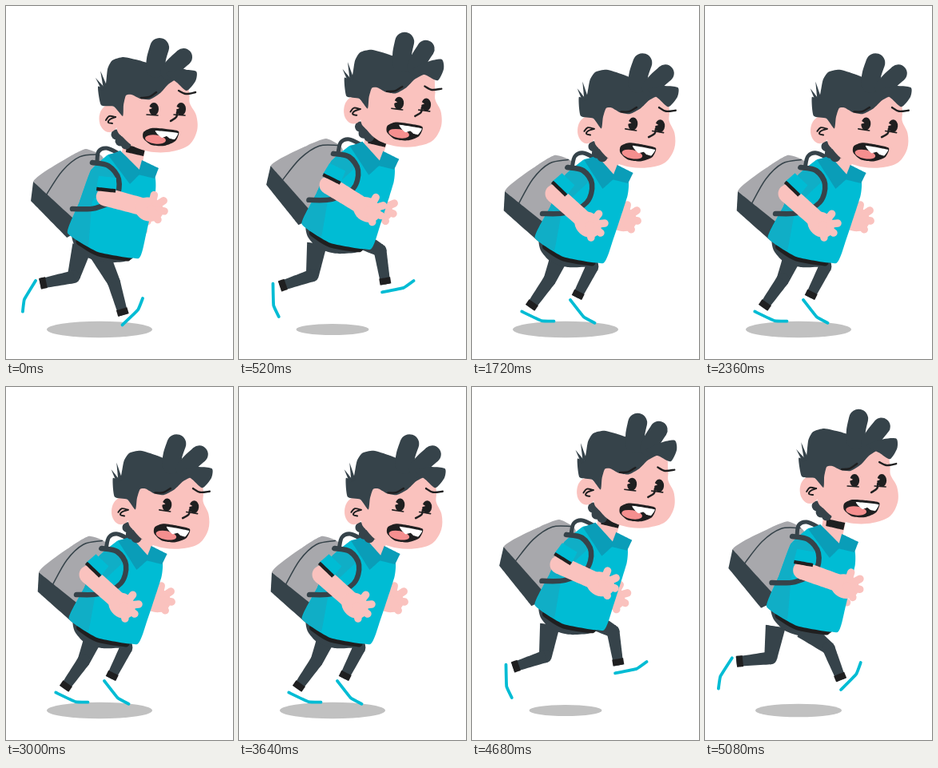
An HTML page with a canvas for the animation above (5120 ms loop, 284 by 442 pixels).

```html
<!DOCTYPE html>
<html lang="en">
<head>
<meta charset="utf-8">
<title>Running boy</title>
<style>
  html, body { margin: 0; width: 100%; height: 100%; overflow: hidden; background: #fff; }
  canvas { display: block; }
</style>
</head>
<body>
<canvas id="stage" width="284" height="442"></canvas>
<script>
const ctx = document.getElementById("stage").getContext("2d");
const STEP = 40, STRIDE = 16, BOB = STRIDE / 2, GROUND = 404;
const SKIN = "#fac2be", DARK = "#36434a", BLACK = "#1f1f20", CYAN = "#00bcd4",
      SHADE = "#10aec6", COLLAR = "#0a9db8", GREY = "#a8a8ac";

let frame = 0;
const wave = (period, phase, mean, swing, peak) =>
  mean + swing * Math.cos((phase - peak) / period * 2 * Math.PI);
// The body bobs once per step; limbs swing once per stride.
const bob = (mean, swing, peak) => wave(BOB, frame, mean, swing, peak);
const radians = degrees => degrees * Math.PI / 180;

// Spline through flat x,y pairs; curve 0 gives straight edges.
function trace(flat, closed, curve) {
  const n = flat.length / 2;
  const pt = i => {
    const k = closed ? (i + n) % n : Math.max(0, Math.min(n - 1, i));
    return [flat[2 * k], flat[2 * k + 1]];
  };
  ctx.beginPath();
  ctx.moveTo(...pt(0));
  for (let i = 0; i < (closed ? n : n - 1); i++) {
    const [p, a, b, q] = [pt(i - 1), pt(i), pt(i + 1), pt(i + 2)];
    ctx.bezierCurveTo(a[0] + (b[0] - p[0]) * curve, a[1] + (b[1] - p[1]) * curve,
                      b[0] - (q[0] - a[0]) * curve, b[1] - (q[1] - a[1]) * curve, b[0], b[1]);
  }
}
function fill(color, flat, curve = 0) {
  trace(flat, true, curve);
  ctx.fillStyle = color;
  ctx.fill();
}
function line(color, width, flat, curve = 1 / 6) {
  trace(flat, false, curve);
  ctx.strokeStyle = color;
  ctx.lineWidth = width;
  ctx.lineCap = ctx.lineJoin = "round";
  ctx.stroke();
}
function oval(color, x, y, rx, ry = rx, turn = 0) {
  ctx.beginPath();
  ctx.ellipse(x, y, rx, ry, turn, 0, 2 * Math.PI);
  ctx.fillStyle = color;
  ctx.fill();
}
function taper(color, [x0, y0], w0, [x1, y1], w1) {
  const len = Math.hypot(x1 - x0, y1 - y0);
  const nx = (y0 - y1) / len / 2, ny = (x1 - x0) / len / 2;
  fill(color, [x0 + nx * w0, y0 + ny * w0, x1 + nx * w1, y1 + ny * w1,
               x1 - nx * w1, y1 - ny * w1, x0 - nx * w0, y0 - ny * w0]);
}
// Runs paint inside its own coordinate frame.
function posed(pose, paint) {
  ctx.save();
  pose();
  paint();
  ctx.restore();
}
function turnAbout(x, y, degrees) {
  ctx.translate(x, y);
  ctx.rotate(radians(degrees));
  ctx.translate(-x, -y);
}
// Angle 0 points forward, 90 points down.
const reach = ([x, y], degrees, length) =>
  [x + length * Math.cos(radians(degrees)), y + length * Math.sin(radians(degrees))];
const between = (a, b, u) => a.map((v, i) => v + (b[i] - v) * u);

function drawLeg(phase) {
  const swing = (mean, amount, peak) => wave(STRIDE, phase, mean, amount, peak);
  const twice = (mean, amount, peak) => wave(BOB, phase, mean, amount, peak);
  const hip = [twice(116, 11, 3.4) + swing(0, 22, 13.3), twice(299, 7, 0.6) + swing(0, 9, 2.6)];
  const thigh = 90 - swing(9, 36, 13.6) - twice(0, 22, 5.8);
  const shin = 90 - swing(-31, 53, 14.8);
  const foot = swing(30, 85, 7.4);
  const knee = reach(hip, thigh, 40);
  const ankle = reach(knee, shin, 43);

  const heel = reach(reach(ankle, shin, 8), foot, -6);
  const ball = reach(reach(heel, foot, 27), foot + 90, 4);
  const toe = reach(heel, foot, 42);
  const sole = [heel, ball, toe].flatMap(([x, y]) => [x, Math.min(y, GROUND)]);
  fill("#fff", [...ankle, ...sole]);
  line(CYAN, 3.8, sole, .05);

  taper(DARK, hip, 25, knee, 16);
  oval(DARK, ...knee, 8);
  taper(DARK, knee, 16, ankle, 12);
  taper(BLACK, reach(ankle, shin, -8), 14, ankle, 14);
}

function drawArm(phase, shoulder) {
  const upper = 90 - wave(STRIDE, phase, -29, 24, 0.7);
  const lower = wave(STRIDE, phase, 28, -16, 1.6);
  const elbow = reach(shoulder, upper, 36);
  const palm = reach(elbow, lower, 59);
  oval(SKIN, ...elbow, 11.5);
  taper(SKIN, elbow, 23, palm, 22);
  posed(() => { ctx.translate(...palm); ctx.rotate(radians(lower)); }, () => {
    oval(SKIN, -2, 1, 18, 15);
    for (const [angle, length] of [[-92, 18], [-48, 19], [-6, 17], [42, 16]])
      line(SKIN, 9.5, [0, 0, ...reach([0, 0], angle, length)]);
  });
  taper(CYAN, between(shoulder, elbow, .3), 22, between(shoulder, elbow, .76), 25);
  taper(BLACK, between(shoulder, elbow, .7), 24, between(shoulder, elbow, .82), 24);
}

function drawBackpack() {
  fill(GREY, [34, 221, 77, 190, 100, 179, 122, 192, 100, 276], .07);
  fill(DARK, [34, 220, 31, 244, 76, 290, 97, 278]);
  line(DARK, 1.5, [50, 237, 70, 207, 92, 189, 116, 186]);
}

function drawTorso() {
  line(DARK, 5, [114, 194, 116, 182, 126, 178, 142, 185]);
  fill(DARK, [84, 285, 86, 300, 100, 314, 122, 321, 148, 320, 158, 314, 120, 300], .12);
  line(BLACK, 9, [92, 295, 116, 309, 152, 315]);
  fill(CYAN, [128, 186, 106, 206, 92, 245, 77, 284, 115, 308, 166, 316, 175, 287,
              187, 232, 186, 213, 165, 203, 145, 185], .07);
  fill(SHADE, [118, 197, 106, 206, 92, 245, 77, 284, 103, 300, 108, 245, 140, 210], .04);
  fill(SKIN, [148, 165, 175, 175, 171, 196, 166, 208, 145, 183]);
  fill(BLACK, [151, 174, 174, 179, 172, 188, 150, 183]);
  fill(COLLAR, [128, 187, 143, 181, 170, 208, 155, 223]);
  fill(COLLAR, [170, 193, 191, 203, 186, 216, 165, 211]);
}

function drawStrap() {
  line(DARK, 6.5, [108, 196, 128, 200, 141, 217, 137, 240, 112, 253, 83, 254]);
}

function drawHair() {
  fill(DARK, [115, 101, 124, 103, 127, 79, 133, 68, 147, 64, 166, 68, 180, 72, 205, 76, 226, 80,
              228, 92, 215, 91, 203, 98, 193, 109, 180, 117, 168, 116, 157, 111, 150, 112,
              147, 124, 146, 138, 135, 126, 119, 124], .1);
  fill(DARK, [112, 90, 125, 104, 120, 106]);
  fill(DARK, [118, 81, 127, 102, 122, 104]);
  const sway = bob(-4.5, 8, 1.25);
  posed(() => turnAbout(188, 85, sway * .6), () => line(DARK, 24, [187, 78, 188, 66, 192, 52]));
  posed(() => turnAbout(204, 84, sway * 1.5), () => {
    line(DARK, 22, [204, 82, 212, 73, 222, 64]);
    fill(DARK, [200, 84, 222, 80, 238, 82, 237, 94, 226, 106, 214, 96], .12);
  });
}

function drawHead() {
  for (const [x, y] of [[138, 161], [143, 169], [150, 173]]) oval(DARK, x, y, 6.5);
  oval(SKIN, 129, 141, 12.5, 17);
  fill(SKIN, [142, 100, 180, 85, 222, 90, 229, 108, 230, 122, 238, 137, 239, 156, 229, 174,
              208, 182, 185, 183, 162, 177, 147, 165, 138, 150], 1 / 6);
  line(BLACK, 2, [125, 143, 129, 138, 137, 139]);
  line(BLACK, 2, [137, 139, 130, 142, 128, 146, 133, 147]);
  drawHair();

  // Brows, eyes and nose
  line(BLACK, 2.4, [169, 115, 179, 114, 188, 108]);
  line(BLACK, 2.4, [216, 106, 225, 110, 237, 108]);
  for (const x of [185, 219]) {
    oval(BLACK, x, 129, 6, 8);
    fill(SKIN, [x - 7, 125, x - 2, 128, x - 7, 130]);
    line(BLACK, 1.6, [x - 9, 136, x + 5, 137]);
  }
  line(BLACK, 2.5, [214, 133, 213, 139, 206, 144]);

  // Mouth
  fill(BLACK, [172, 158, 182, 153, 200, 154, 216, 157, 212, 169, 198, 175, 182, 174, 172, 166], .12);
  oval("#f58f8f", 187, 167, 13, 5.5, .12);
  fill("#fff", [187, 156, 215, 159, 211, 167, 205, 166, 201, 163, 195, 165, 190, 161], .06);
}

function draw() {
  ctx.fillStyle = "#fff";
  ctx.fillRect(0, 0, 284, 442);
  const shadow = Math.min(66, bob(60, 15.7, 1.5));
  oval("#c1c1c1", 117, 405, shadow, shadow * .155);

  const bodyY = bob(-1.5, 12.2, 1.84);
  const leanTorso = () => {
    const lean = bob(.06, .061, 3.8);
    ctx.transform(1, 0, -lean, 1, lean * 300, bodyY);
  };
  drawArm(frame + BOB, [142, 211 + bodyY]);
  drawLeg(frame);
  drawLeg(frame + BOB);
  posed(() => {
    ctx.translate(bob(3.5, 4.5, 3.1), bob(-2, 19, 1.87));
    turnAbout(65, 235, bob(.5, 6.9, 5.9));
  }, drawBackpack);
  posed(leanTorso, drawTorso);
  posed(() => {
    ctx.translate(bob(9, 9, 3.9), bob(3.5, 18.7, 2.24));
    turnAbout(190, 135, bob(2.25, 2.4, 3.5));
  }, drawHead);
  posed(leanTorso, drawStrap);
  drawArm(frame, [128, 203 + bodyY]);
}

function tick() {
  frame = Math.floor(performance.now() / STEP) % STRIDE;
  draw();
  requestAnimationFrame(tick);
}
tick();
</script>
</body>
</html>
```
